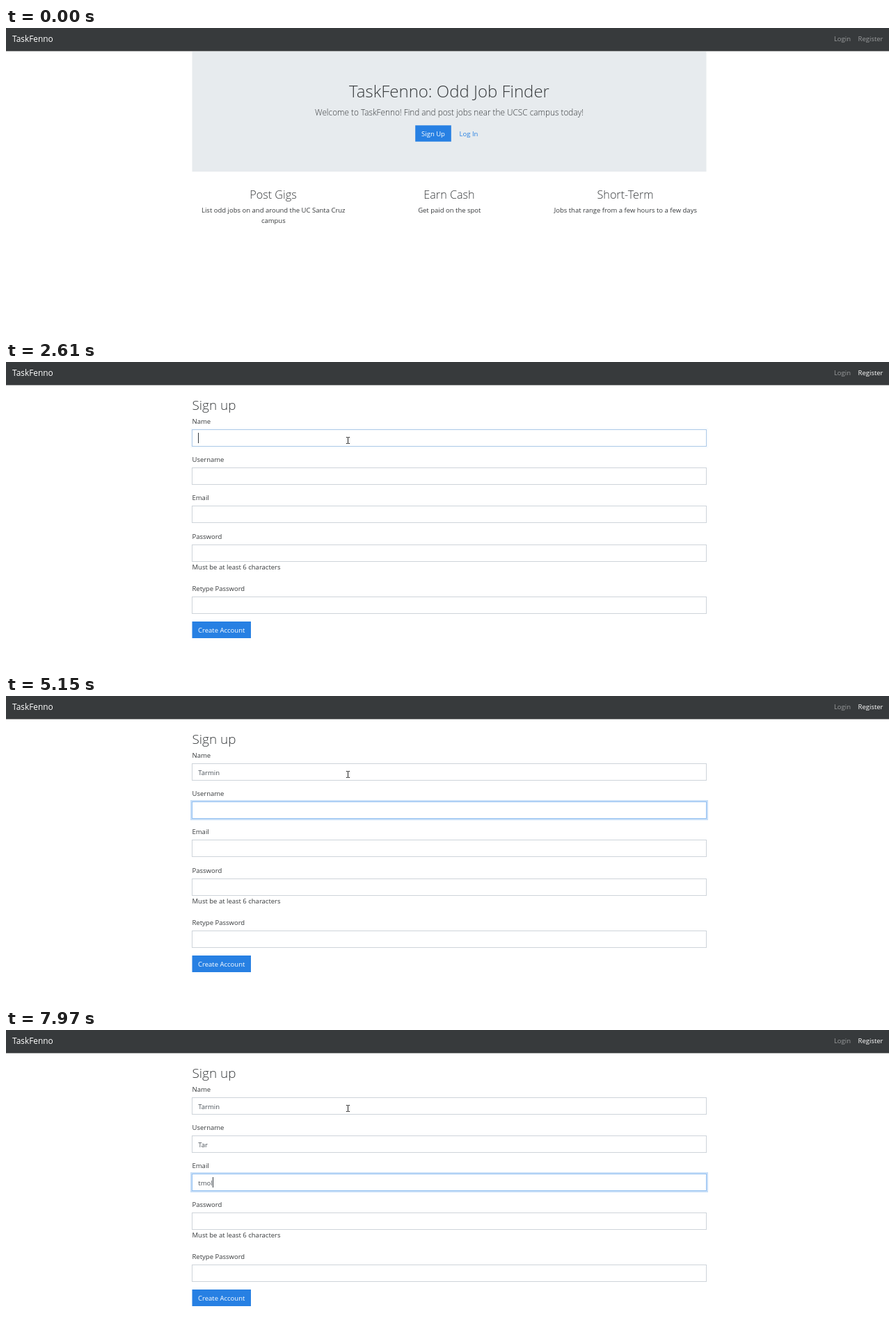
These frames come from a looping animation (1269 px wide and 441 px high, 8 s). An HTML page:

```html
<!DOCTYPE html>
<html lang="en">
<head>
<meta charset="utf-8">
<title>TaskFenno</title>
<style>
  html, body { margin: 0; width: 100%; height: 100%; overflow: hidden; background: #fff; }
  svg { display: block; position: absolute; left: 0; top: 0; }
  text { font: 400 9.5px 'Open Sans', 'Noto Sans', sans-serif; fill: #373a3c; }
  .brand { font-size: 11.9px; fill: #fff; }
  .nav { fill: #9b9d9e; }
  .on { fill: #fff; }
  .h1, .h2, .h3, .lead { font-weight: 300; }
  .h1 { font-size: 24px; }
  .h2 { font-size: 18.9px; }
  .h3 { font-size: 16.2px; }
  .lead { font-size: 11.8px; }
  .link { fill: #2780e3; }
  .value { fill: #495057; }
  .mid { text-anchor: middle; }
  .end { text-anchor: end; }
</style>
</head>
<body>
<svg id="stage" width="1269" height="441" viewBox="0 0 1269 441"></svg>
<script>
const LOOP = 8000;
const PAGE_SWITCH = 1640;
const stage = document.getElementById('stage');

function add(parent, tag, attrs, content) {
  const el = document.createElementNS('http://www.w3.org/2000/svg', tag);
  for (const key in attrs) el.setAttribute(key, attrs[key]);
  if (content) el.textContent = content;
  parent.appendChild(el);
  return el;
}
const box = (parent, x, y, width, height, fill) => add(parent, 'rect', { x, y, width, height, fill });
const label = (parent, x, y, content, cls = '') => add(parent, 'text', { x, y, class: cls }, content);
const show = (el, on) => el.setAttribute('visibility', on ? 'visible' : 'hidden');

// Navigation bar
box(stage, 0, 0, 1269, 33.4, '#373a3c');
label(stage, 9, 20, 'TaskFenno', 'brand');
label(stage, 1214, 19, 'Login', 'nav end');
const register = label(stage, 1260.5, 19, 'Register', 'nav end');

// Landing page
const home = add(stage, 'g', {});
box(home, 267.5, 34, 739, 173, '#e7ebee');
label(home, 637, 100, 'TaskFenno: Odd Job Finder', 'h1 mid');
label(home, 637, 126, 'Welcome to TaskFenno! Find and post jobs near the UCSC campus today!', 'lead mid');
const signUp = box(home, 588.2, 140.3, 51.6, 23.4, '#2780e3');
label(home, 614, 156, 'Sign Up', 'on mid');
label(home, 665, 156, 'Log In', 'link mid');
[
  ['Post Gigs', 'List odd jobs on and around the UC Santa Cruz', 'campus'],
  ['Earn Cash', 'Get paid on the spot'],
  ['Short-Term', 'Jobs that range from a few hours to a few days']
].forEach(([title, ...lines], i) => {
  const x = 384 + 253 * i;
  label(home, x, 246, title, 'h3 mid');
  lines.forEach((line, n) => label(home, x + 0.3, 266 + 15 * n, line, 'mid'));
});

// Sign-up form
const form = add(stage, 'g', {});
label(form, 267.5, 69, 'Sign up', 'h2');
const fields = [['Name', 97], ['Username', 152], ['Email', 207], ['Password', 263], ['Retype Password', 338]]
  .map(([name, top]) => {
    label(form, 267.5, top - 8, name);
    const glow = add(form, 'rect', {
      x: 266, y: top - 1, width: 742, height: 27,
      fill: 'none', stroke: '#2780e3', 'stroke-width': 2, 'stroke-opacity': 0
    });
    const frame = add(form, 'rect', { x: 267.5, y: top + 0.5, width: 739, height: 24, fill: '#fff' });
    return { top, glow, frame, value: label(form, 276.3, top + 17, '', 'value') };
  });
label(form, 267.5, 299, 'Must be at least 6 characters');
box(form, 267.5, 374, 84.5, 24, '#2780e3');
label(form, 309.7, 390, 'Create Account', 'on mid');
const caret = box(form, 276, 0, 1, 15, '#343a40');

// Mouse pointers
const arrow = add(stage, 'path', {
  d: 'M.5 .5V11L2.9 8.8L4.5 12.4L6.2 11.6L4.7 8.2H7.7Z',
  fill: '#fff', stroke: '#111', 'stroke-width': 0.9
});
const beam = add(stage, 'path', {
  d: 'M-2.5 -4.5H-.7M.7 -4.5H2.5M0 -4.5V4.5M-2.5 4.5H-.7M.7 4.5H2.5',
  fill: 'none', stroke: '#222', 'stroke-width': 1
});

// Per field: [time, value] steps for focus strength, typed text and caret
const focus = [
  [[2560, 0.05], [2610, 0.35], [2680, 1], [4660, 0.85], [4720, 0.4], [4780, 0]],
  [[4660, 0.12], [4720, 0.7], [4780, 1], [6620, 0.9], [6680, 0.4], [6740, 0]],
  [[6620, 0.12], [6680, 0.65], [6740, 1]]
];
const typing = [
  ['Tarmin', [3620, 3800, 3990, 4110, 4230, 4350]],
  ['Tar', [5860, 6040, 6220]],
  ['tmol', [7480, 7660, 7780, 7970]]
];
const carets = [
  [2560, 0], [3040, -1], [3570, 0], [4600, -1], [4660, 1],
  [5150, -1], [5680, 1], [6620, 2], [7110, -1], [7480, 2]
];

const stepAt = (steps, t, start) => steps.reduce((v, [at, next]) => t >= at ? next : v, start);
const clamp = v => Math.max(0, Math.min(1, v));
const lerp = (a, b, p) => a + (b - a) * p;
const easeOut = p => 1 - (1 - p) ** 2;
const easeInOut = p => p * p * (3 - 2 * p);
const mix = (a, b, p) => `rgb(${a.map((v, i) => Math.round(lerp(v, b[i], p)))})`;

// Moves advance in 60 ms ticks
const progress = (t, from, span) => clamp((Math.floor((t - from) / 60) + 1) * 60 / span);

function pointerAt(t) {
  if (t < 1890) {
    const p = easeOut(progress(t, 500, 660));
    return [lerp(625, 615, p), lerp(0, 145, p)];
  }
  const p = easeInOut(progress(t, 1890, 480));
  return [lerp(615, 491, p), lerp(145, 113, p)];
}

function drawPointer(t) {
  const [x, y] = pointerAt(t).map(Math.round);
  const overText = t < PAGE_SWITCH ? (y > 78 && y < 131) : y < 122;
  show(arrow, t >= 500 && !overText);
  show(beam, t >= 500 && overText);
  arrow.setAttribute('transform', `translate(${x} ${y})`);
  beam.setAttribute('transform', `translate(${x + 0.5} ${y})`);
}

function drawForm(t) {
  fields.forEach((field, i) => {
    const level = stepAt(focus[i] || [], t, 0);
    field.frame.setAttribute('stroke', mix([206, 212, 218], [147, 192, 241], clamp(level * 1.6)));
    field.glow.setAttribute('stroke-opacity', 0.25 * level * level);
    if (!typing[i]) return;
    const [word, times] = typing[i];
    const typed = word.slice(0, times.filter(at => t >= at).length);
    if (field.value.textContent !== typed) field.value.textContent = typed;
  });
  const active = stepAt(carets, t, -1);
  caret.setAttribute('visibility', active < 0 ? 'hidden' : 'inherit');
  if (active >= 0) {
    const { value, top } = fields[active];
    const width = value.textContent ? value.getComputedTextLength() : 0;
    caret.setAttribute('x', 276 + Math.ceil(width));
    caret.setAttribute('y', top + 5);
  }
}

function draw(t) {
  const onForm = t >= PAGE_SWITCH;
  show(home, !onForm);
  show(form, onForm);
  register.setAttribute('class', onForm ? 'on end' : 'nav end');
  signUp.setAttribute('fill', mix([39, 128, 227], [27, 108, 200], clamp((t - 1050) / 150)));
  drawForm(t);
  drawPointer(t);
}

const start = performance.now();
function tick() {
  draw((performance.now() - start) % LOOP);
  requestAnimationFrame(tick);
}
tick();
</script>
</body>
</html>
```
